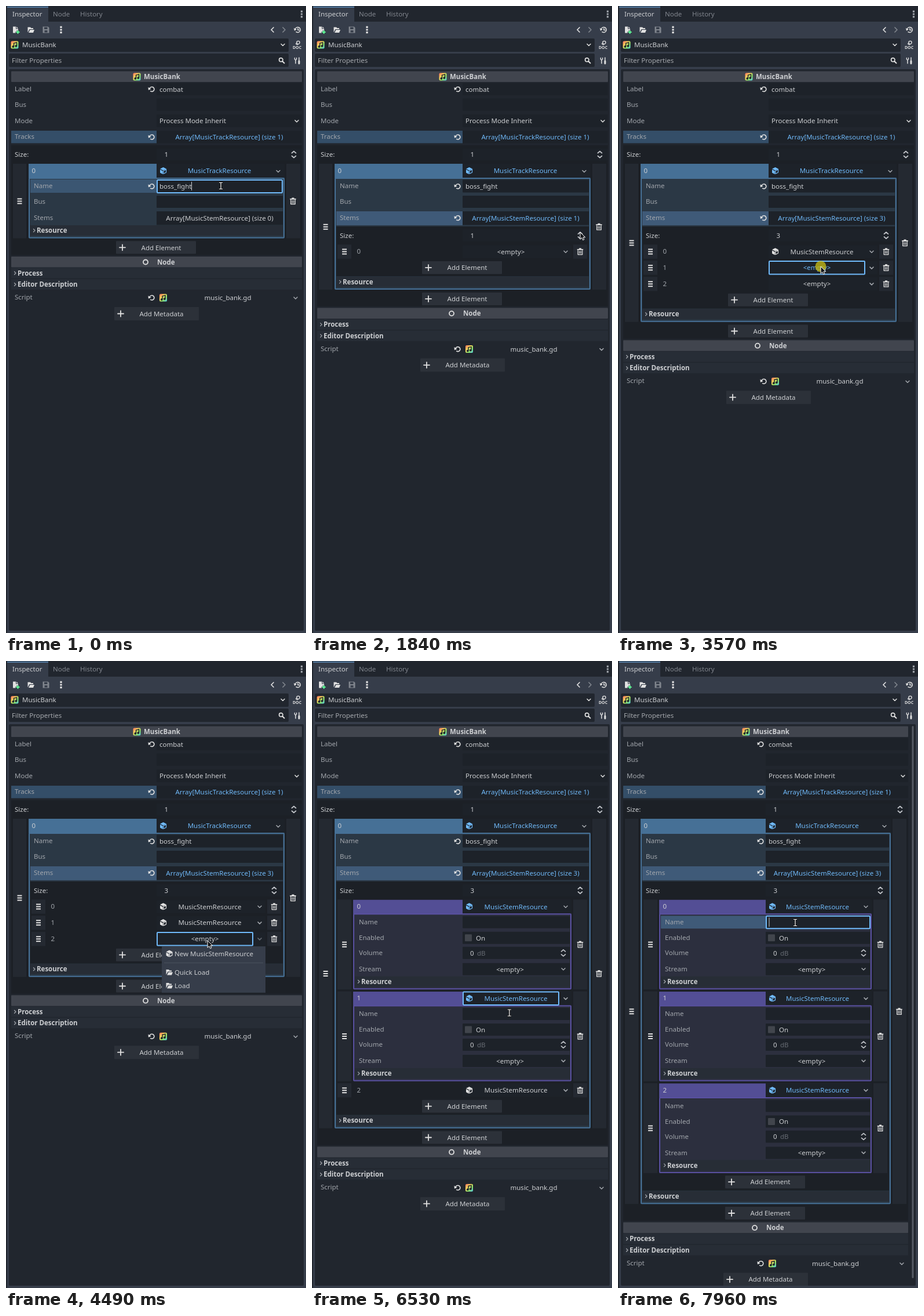
Write an HTML page that moves like this. It is 518 px wide and 1081 px high and loops after 8 s.

```html
<!DOCTYPE html>
<html lang="en">
<head>
<meta charset="utf-8">
<title>Inspector</title>
<style>
html, body { margin: 0; width: 100%; height: 100%; overflow: hidden; background: #363d4a; }
svg { display: block; width: 518px; height: 1081px; }
text { font: 11.5px "Noto Sans", sans-serif; white-space: pre; }
.bold { font-weight: 700; }
.mid { text-anchor: middle; }
</style>
</head>
<body>
<svg viewBox="0 0 518 1081">
  <defs>
    <linearGradient id="rainbow" x1="0" y1="0" x2="1" y2="1">
      <stop offset="0" stop-color="#ff6b5e"/><stop offset=".35" stop-color="#ffd35c"/>
      <stop offset=".65" stop-color="#8fe86a"/><stop offset="1" stop-color="#4fc3e8"/>
    </linearGradient>
    <clipPath id="view"><rect x="5" y="109" width="509" height="968"/></clipPath>
  </defs>
  <g id="chrome"></g>
  <g id="panel" clip-path="url(#view)"></g>
  <circle id="click" r="9.5" fill="#c4b814" opacity=".78"/>
  <g id="pointer"></g>
</svg>
<script>
const LOOP = 8000;
const TEXT = '#cdcfd2', DIM = '#a2a6ac', FAINT = '#666b73', BLUE = '#70bafa';
const FIELD = '#1d2229', DARK = '#1c2026', SIDE = '#242931', BUTTON = '#2c3139';
const $ = id => document.getElementById(id);

const line = (d, w = 1.5) =>
  `<path d="${d}" fill="none" stroke="currentColor" stroke-width="${w}" stroke-linecap="round" stroke-linejoin="round"/>`;
const fill = d => `<path d="${d}" fill="currentColor"/>`;

const icons = {
  dots: fill('M-1.6-6.2h3.2v3.2h-3.2zM-1.6-1.6h3.2v3.2h-3.2zM-1.6 3h3.2v3.2h-3.2z'),
  down: line('M-3-1.5L0 1.5 3-1.5'),
  left: line('M2-4L-2 0 2 4', 1.7),
  right: line('M-2-4L2 0-2 4', 1.7),
  fold: line('M-1-2.5L1.5 0-1 2.5', 1.3),
  spin: line('M-3.5-2.5L0-5.5 3.5-2.5M-3.5 2.5L0 5.5 3.5 2.5', 1.7),
  grip: line('M-4-4H4M-4 0H4M-4 4H4', 2).replaceAll('round', 'butt'),
  trash: line('M-3.8-2V5H3.8V-2M-1.3-1V3M1.3-1V3', 1.3) + fill('M-5.2-4.5h3.2v-1.5h4v1.5h3.2v1.8h-10.4z'),
  plus: line('M-5 0H5M0-5V5', 1.8),
  revert: line('M-3.5-1.2A4 4 0 1 1-1.8 3.4', 1.6) + fill('M-6-3.6L-1-.2-5.6 1.6z'),
  cube: fill('M0-6L5.5-3.2 0-.5-5.5-3.2zM-5.5-1.9L-.7.6V6L-5.5 3.4z') + line('M5-2.4V3L.4 5.2V.4z', 1.2),
  folder: fill('M-5.5 4.5V-4.5H-1L.5-3H4V-1H-2.5zM-4 5L-1.5 0H6L4 5z'),
  file: fill('M-5-5.5H0V-1.5H4V1H1.5V3H-.5V5.5H-5zM1-5.5L4-2.5H1z')
    + '<path d="M3.5 1V7M.5 4H6.5" stroke="#5fff97" stroke-width="2"/>',
  save: '<path fill-rule="evenodd" d="M-5.5-5.5H3.5L5.5-3.5V5.5H-5.5zM-3-4.5V-1H2.5V-4.5zM-2.5 1V4.5H2.5V1z" fill="currentColor"/>',
  history: line('M-3.5-1.5A4.5 4.5 0 1 1-2 3.6M1-2.2V.5H3.2', 1.5) + fill('M-6-3L-1.2-.6-5 1.8z'),
  doc: line('M-2-2.3L.5-.2M-1.5-1H2', 1.2)
    + '<circle cx="2" cy="-4" r="2.6" fill="none" stroke="currentColor" stroke-width="1.4"/>'
    + '<text x="0" y="6.5" class="mid bold" style="font-size:7px" fill="currentColor">DOC</text>',
  search: '<circle cx="-1.2" cy="-1.2" r="3.2" fill="none" stroke="currentColor" stroke-width="1.7"/>' + line('M1.5 1.5L4.5 4.5', 2),
  tools: line('M-3-1V5M3-5V0', 1.5) + line('M3 1V5', 3) + line('M-4.6-4.5V-2L-3-1-1.4-2V-4.5', 1.4),
  node: '<circle r="4" fill="none" stroke="currentColor" stroke-width="1.8"/>',
  music: '<rect x="-6.5" y="-6.5" width="13" height="13" rx="2" fill="url(#rainbow)"/>'
    + '<path d="M-1.5 3V-3L3.5-4V2" fill="none" stroke="#23272e" stroke-width="1.5"/>'
    + '<circle cx="-2.7" cy="3" r="1.9" fill="#23272e"/><circle cx="2.3" cy="2" r="1.9" fill="#23272e"/>',
  arrow: '<path d="M0 0V12.2L2.9 9.6 4.7 13.6 6.9 12.6 5.1 8.8H8.8Z" fill="#15171a" stroke="#fff" stroke-width="1"/>',
  beam: '<path d="M-3-5.5H3M0-5.5V5.5M-3 5.5H3" stroke="#111" stroke-width="3"/>'
    + '<path d="M-3-5.5H3M0-5.5V5.5M-3 5.5H3" stroke="#fff" stroke-width="1.2"/>'
};

const icon = (name, x, y, color = '#e0e0e0') =>
  `<g transform="translate(${x} ${y})" color="${color}">${icons[name]}</g>`;
const box = (x1, y1, x2, y2, color, r = 0) =>
  `<rect x="${x1}" y="${y1}" width="${x2 - x1}" height="${y2 - y1}" rx="${r}" fill="${color}"/>`;
const ring = (x1, y1, x2, y2, color = BLUE) =>
  `<rect x="${x1 + 1}" y="${y1 + 1}" width="${x2 - x1 - 2}" height="${y2 - y1 - 2}" rx="1" fill="none" stroke="${color}" stroke-width="2"/>`;
const text = (x, y, str, color = TEXT, cls = '') =>
  `<text x="${x}" y="${y + 4.2}" fill="${color}" class="${cls}">${str}</text>`;
const mid = (x, y, str, color, cls = '') => text(x, y, str, color, 'mid ' + cls);

function chrome() {
  return box(0, 0, 518, 27, '#21262e') + box(0, 0, 2, 1081, '#21262e')
    + box(2, 2, 73, 28, '#363d4a') + box(2, 1, 73, 2.5, '#5d90c0')
    + text(11, 14, 'Inspector') + text(81, 14, 'Node', '#80858d') + text(128, 14, 'History', '#80858d')
    + icon('dots', 510.5, 14, '#9a9ea5')
    + icon('file', 17, 41) + icon('folder', 43, 41) + icon('save', 69, 41, '#80858d') + icon('dots', 95, 41)
    + icon('left', 460, 41) + icon('right', 480, 41, '#80858d') + icon('history', 503, 41)
    + box(5, 56, 488, 79, '#21262e', 2) + icon('music', 15, 67) + text(28, 67, 'MusicBank')
    + icon('down', 478, 67) + icon('doc', 502.5, 67)
    + box(5, 82, 488, 105, '#21262e', 2) + text(10, 94, 'Filter Properties', '#a6a9ae')
    + icon('search', 476, 94) + icon('tools', 503, 94)
    + box(5, 109, 514, 1077, '#21262e', 2);
}

// Panel states over time
const past = (t, times) => times.filter(v => t >= v).length;
const focusAt = [[0, 'name'], [520, 'stems'], [1400, ''], [2480, 0], [3500, 1], [4350, 2],
  [5420, 0], [6200, 1], [7190, 2], [7890, 'stemName']];
const presses = [[520, 600], [1400, 1480], [1860, 1930], [2010, 2080], [2480, 2570], [2950, 3040], [3500, 3580],
  [3910, 3990], [4350, 4430], [4830, 4910], [5420, 5520], [6200, 6300], [7210, 7350], [7890, 7950]];

function stateAt(t) {
  const menu = t >= 2600 && t < 3040 ? 0 : t >= 3600 && t < 3990 ? 1 : t >= 4470 && t < 4910 ? 2 : -1;
  return {
    wide: t >= 600,
    size: past(t, [1480, 1930, 2080]),
    made: past(t, [3040, 3990, 4910]),
    open: past(t, [5520, 6300, 7350]),
    focus: focusAt.filter(f => t >= f[0]).pop()[1],
    menu, blank: t < 2660,
    down: presses.some(p => t >= p[0] && t < p[1]) || (menu === 0 && t < 2660)
  };
}

const rowY = (s, i) => 423.3 + i * 27.8 + Math.min(i, s.open) * 130.5;

function panel(s) {
  const R = s.open > 2 ? 501 : 511, X = 260 + (R - 511) / 2;
  const at = inset => (X + R - inset) / 2;
  const addY = rowY(s, s.size);
  const end = s.wide ? addY + 38 : 400.5;
  const gripY = (272.5 + end) / 2;

  const label = (x, y, str) => text(x, y, str, DIM);
  const field = (y, inset, str = '', h = 21) =>
    box(X, y - h / 2, R - inset, y + h / 2, FIELD, 1) + text(X + 5, y, str);
  const section = (x, y, right, str) =>
    box(x, y - 9, right, y + 9, '#272d36') + icon('fold', x + 6.5, y, DIM) + text(x + 11, y, str, TEXT, 'bold');
  const header = (y, name, str, x) =>
    box(9, y - 9.5, R, y + 9, '#41454e', 1) + icon(name, X - x, y) + text(X + 8 - (x > 30 ? 30 : 7), y, str, TEXT, 'bold');
  const add = y =>
    box(X - 70, y - 11, X + 68, y + 11, BUTTON, 1) + icon('plus', X - 59, y) + mid(X + 8, y, 'Add Element');
  const counter = (x, y, n, inset) =>
    text(x, y, 'Size:') + field(y, inset) + text(X + 13.5, y, n) + icon('spin', R - inset - 14, y, '#c0c3c8');

  function stem(i) {
    const y = rowY(s, i), made = i < s.made, open = i < s.open, foc = s.focus === i;
    const bottom = open ? y + 143 : y + 12.5, c = (y - 12 + bottom) / 2;
    const hot = open || (foc && s.down && s.menu <= 0);
    const color = hot ? BLUE : TEXT;
    let o = box(44, y - 12, 68, bottom, SIDE) + box(R - 60, y - 12, R - 36, bottom, SIDE)
      + icon('grip', 56, c) + icon('trash', R - 48, c);
    if (open) {
      o += box(71, y - 11.5, R - 63, bottom, '#2c2f3e', 1) + box(71, y - 11.5, X, y + 13, '#534e95')
        + box(X, y - 11.5, R - 63, y + 12, FIELD)
        + ring(71, y + 12, R - 63, bottom, '#5950a0');
      if (i === 0 && s.focus === 'stemName') o += box(74, y + 16, X, y + 38, '#3f5a78');
      o += label(81, y + 26.5, 'Name') + field(y + 27, 66)
        + label(81, y + 53.5, 'Enabled') + field(y + 54, 66)
        + box(X + 4, y + 48, X + 16, y + 60, '#41454c', 1) + text(X + 23, y + 54, 'On')
        + label(81, y + 79.5, 'Volume') + field(y + 80, 66)
        + text(X + 13, y + 80, '0') + text(X + 25, y + 80, 'dB', FAINT) + icon('spin', R - 77, y + 80, '#c0c3c8')
        + label(81, y + 107.5, 'Stream') + field(y + 108, 66) + mid(at(87), y + 108, '&lt;empty&gt;')
        + icon('down', R - 77, y + 108, DIM)
        + section(74, y + 129.5, R - 66, 'Resource');
      if (i === 0 && s.focus === 'stemName')
        o += ring(X, y + 15.5, R - 65, y + 39) + box(X + 5.5, y + 19, X + 6.5, y + 35, TEXT);
    } else {
      o += box(X, y - 11, R - 63, y + 11.5, FIELD, 1);
    }
    o += text(77.5, y - .5, i, open ? TEXT : DIM);
    o += made ? icon('cube', X + 11.5, y, open || hot ? BLUE : '#e0e0e0') + mid(at(67), y, 'MusicStemResource', color)
              : mid(at(84), y, '&lt;empty&gt;', color);
    o += icon('down', R - 73, y + .5, s.menu === i && !s.blank ? FAINT : DIM);
    if (foc) o += ring(X, y - 12, R - 84, y + 12.5);
    return o;
  }

  function popup() {
    const y = rowY(s, s.menu) + 13;
    if (s.blank) return box(269, y, 448, y + 80, DARK);
    return box(269, y, 448, y + 80, '#363d4a')
      + icon('cube', 282, y + 12.5) + text(291, y + 12.5, 'New MusicStemResource')
      + box(273, y + 28, 444, y + 29, '#4a515e')
      + icon('folder', 282, y + 44.5) + text(291, y + 44.5, 'Quick Load')
      + icon('folder', 282, y + 67.5) + text(291, y + 67.5, 'Load');
  }

  let o = header(122, 'music', 'MusicBank', 34)
    + label(15, 143, 'Label') + icon('revert', X - 8.5, 143.5) + field(143.5, 0, 'combat')
    + label(15, 170, 'Bus') + field(170, 0)
    + label(15, 197.5, 'Mode') + field(198, 0, 'Process Mode Inherit', 22) + icon('down', R - 9, 198.5)
    + box(9, 215, X, 236.5, '#344e68') + label(15, 225, 'Tracks') + icon('revert', X - 8.5, 226)
    + box(X, 215, R, 236.5, FIELD) + mid(at(0), 226, 'Array[MusicTrackResource] (size 1)', BLUE)
    + box(9, 240, R, end + 29, DARK) + counter(15, 256, 1, 0)
    + box(12, 272, 35, end, SIDE) + box(R - 27, 272, R - 3, end, SIDE)
    + icon('grip', 23.5, gripY) + icon('trash', R - 15.5, gripY)
    + box(39, 272, R - 30, end, '#2b3845', 1)
    + box(39, 272, X, 297, '#467096') + text(44.5, 283.5, '0')
    + box(X, 272, R - 30, 296, FIELD) + icon('cube', X + 11.5, 284, BLUE)
    + mid(at(34), 284, 'MusicTrackResource', BLUE) + icon('down', R - 41, 285, DIM)
    + ring(39, 296, R - 30, end, '#467096');

  if (s.focus === 'name') o += box(42, 299, X, 322, '#3b5672');
  o += label(48, 310, 'Name') + icon('revert', X - 8.5, 311) + field(310.5, 33, 'boss_fight', 22)
    + label(48, 337, 'Bus') + field(337.5, 33);
  if (s.focus === 'name') o += ring(X, 299, R - 33, 323) + box(X + 60, 303, X + 61, 318, TEXT);

  if (s.wide) o += box(42, 354, X, 378, '#3f5a78');
  o += label(48, 365, 'Stems') + box(X, 354, R - 33, 377.5, FIELD)
    + mid(at(33), 365.5, `Array[MusicStemResource] (size ${s.size})`, s.wide || s.focus === 'stems' ? BLUE : TEXT);
  if (s.size) o += icon('revert', X - 8.5, 365.5);
  if (s.focus === 'stems') o += ring(X, 353.5, R - 33, 378);

  if (s.wide) {
    o += box(42, 380, R - 33, addY + 15, DARK) + counter(48, 395.5, s.size, 34);
    for (let i = 0; i < s.size; i++) o += stem(i);
    o += add(addY);
  }
  o += section(42, end - 13.5, R - 33, 'Resource') + add(end + 15.8)
    + header(end + 41, 'node', 'Node', 19)
    + section(9, end + 60, R, 'Process') + section(9, end + 79.5, R, 'Editor Description')
    + label(15, end + 101.5, 'Script') + icon('revert', X - 8.5, end + 102.5) + icon('music', X + 11.5, end + 102.5)
    + mid(at(5), end + 102.5, 'music_bank.gd') + icon('down', R - 11, end + 103, DIM)
    + box(X - 73, end + 118.5, X + 73, end + 141.5, BUTTON, 1) + icon('plus', X - 62, end + 130)
    + mid(X + 8.5, end + 130, 'Add Metadata');
  if (s.open > 2) o += box(507.5, 112, 510.5, 1064, '#565b65', 1.5);
  if (s.menu >= 0) o += popup();
  return o;
}

// Pointer path: time, x, y
const path = [
  [180, 371, 310], [500, 373, 363], [660, 373, 363], [1160, 460, 401], [1360, 463, 390], [2120, 463, 390],
  [2450, 376, 422], [2650, 376, 422], [2900, 345, 447], [3060, 345, 447], [3400, 350, 449], [3600, 350, 449],
  [3860, 345, 476], [4000, 345, 476], [4250, 348, 482], [4500, 348, 482], [4780, 344, 503], [4930, 344, 503],
  [5390, 333, 429], [5620, 333, 429], [6150, 340, 585], [6360, 340, 585], [7100, 346, 744], [7370, 346, 744],
  [7860, 306, 451]
];

function pointAt(t) {
  const k = path.findIndex(p => p[0] > t);
  if (k === 0) return path[0].slice(1);
  if (k < 0) return path[path.length - 1].slice(1);
  const a = path[k - 1], b = path[k];
  const u = (t - a[0]) / (b[0] - a[0]), e = u * u * (3 - 2 * u);
  return [a[1] + (b[1] - a[1]) * e, a[2] + (b[2] - a[2]) * e];
}

function overText(s, x, y) {
  if (x < 255 || x > 445 || s.menu >= 0) return false;
  const fields = [310.5, 337.5];
  for (let i = 0; i < s.open; i++) fields.push(rowY(s, i) + 27);
  return fields.some(f => Math.abs(y - f) < 11);
}

let shown = '', shape = '';
function draw(t) {
  const s = stateAt(t), key = JSON.stringify(s);
  if (key !== shown) $('panel').innerHTML = panel(s);
  shown = key;

  const [x, y] = pointAt(t);
  const kind = overText(s, x, y) ? 'beam' : 'arrow';
  if (kind !== shape) $('pointer').innerHTML = icons[kind];
  shape = kind;
  $('pointer').setAttribute('transform', `translate(${x.toFixed(1)} ${y.toFixed(1)})`);

  const click = $('click'), pressed = presses.some(p => t >= p[0] && t < p[1]);
  click.setAttribute('cx', x);
  click.setAttribute('cy', y);
  click.style.display = pressed ? '' : 'none';
}

$('chrome').innerHTML = chrome();
const start = performance.now();
function tick() {
  draw((performance.now() - start) % LOOP);
  requestAnimationFrame(tick);
}
tick();
</script>
</body>
</html>
```
